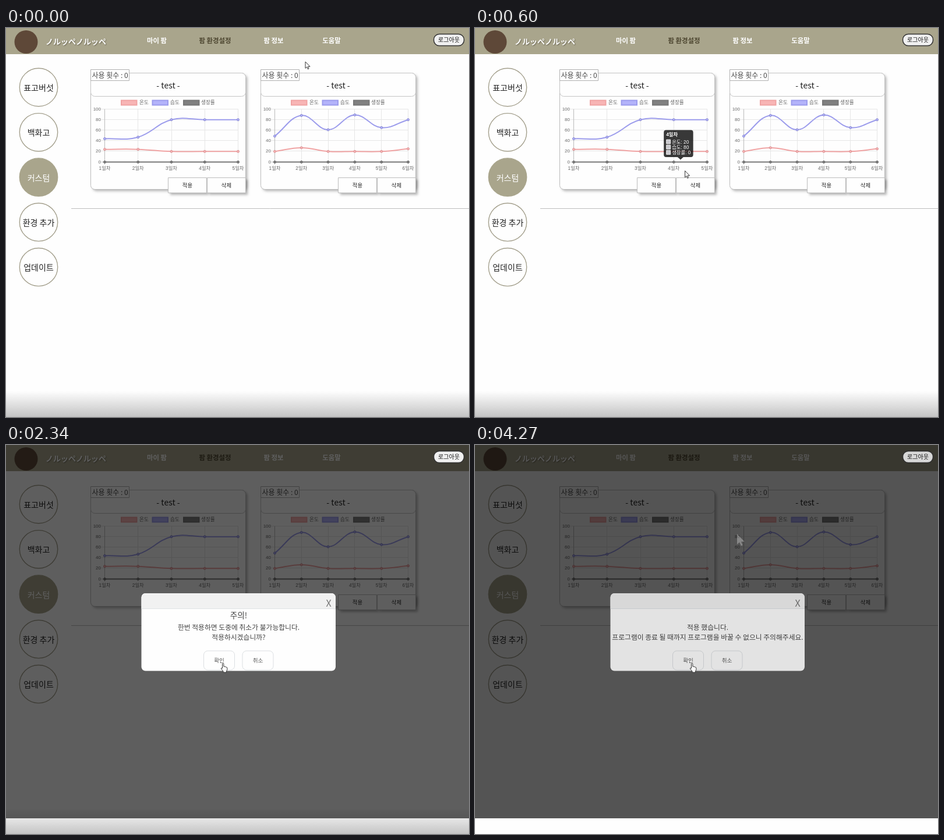
These frames come from a looping animation (795 by 669 pixels, 4.3 s). An HTML page with a canvas:

```html
<!DOCTYPE html>
<html lang="ko">
<head>
<meta charset="utf-8">
<title>팜 환경설정</title>
<style>
html, body { margin: 0; width: 100%; height: 100%; overflow: hidden; background: #fefefe; }
canvas { display: block; }
</style>
</head>
<body>
<canvas id="stage" width="795" height="669"></canvas>
<script>
const LOOP = 4300;
const ctx = document.getElementById('stage').getContext('2d');
const KR = '"Noto Sans CJK KR", "Noto Sans CJK JP", "Noto Sans CJK", sans-serif';
const CHART = '"Liberation Sans", ' + KR;
const OLIVE = '#a9a58c';

const clamp = v => Math.max(0, Math.min(1, v));
const outQuart = v => 1 - Math.pow(1 - clamp(v), 4);
const mix = (a, b, k) => a + (b - a) * k;

function text(s, x, cy, size, color, align = 'center', weight = 400, family = KR) {
  ctx.font = `${weight} ${size}px ${family}`;
  ctx.textAlign = align;
  ctx.fillStyle = color;
  ctx.fillText(s, x, cy + size * 0.36);
}

function box(x, y, w, h, r, fill, stroke, width = 1) {
  ctx.beginPath();
  ctx.roundRect(x, y, w, h, r);
  if (fill) { ctx.fillStyle = fill; ctx.fill(); }
  if (stroke) { ctx.strokeStyle = stroke; ctx.lineWidth = width; ctx.stroke(); }
}

function line(x1, y1, x2, y2, color) {
  ctx.beginPath();
  ctx.moveTo(x1, y1);
  ctx.lineTo(x2, y2);
  ctx.strokeStyle = color;
  ctx.lineWidth = 1;
  ctx.stroke();
}

function shadowed(draw) {
  ctx.save();
  ctx.shadowColor = 'rgba(0,0,0,.28)';
  ctx.shadowOffsetX = ctx.shadowOffsetY = 3;
  ctx.shadowBlur = 4;
  draw();
  ctx.restore();
}

const series = [
  { name: '온도', x: 197, label: 229, fill: '#f8b5b5', line: '#f0a3a3', dot: '#d98f92' },
  { name: '습도', x: 250.5, label: 282, fill: '#b3b3fa', line: '#9c9cec', dot: '#8787d0' },
  { name: '생장률', x: 304, label: 335, fill: '#808080', line: '#777', dot: '#666' }
];
const cards = [
  { dx: 0, data: [[24, 24, 20, 20, 20], [44, 47, 80, 80, 80], [0, 0, 0, 0, 0]] },
  { dx: 292, data: [[20, 27, 20, 20, 20, 25], [49, 88, 61, 89, 65, 80], [0, 0, 0, 0, 0, 0]] }
];
const plot = { x: 169.5, w: 229, top: 139.5, base: 230.5 };
const yOf = v => plot.base - v * 0.91;

// Cubic spline with tension weighted by neighbour distance.
function curve(pts) {
  const capY = y => Math.max(plot.top, Math.min(plot.base, y));
  const ctrl = pts.map((p, i) => {
    const a = pts[i - 1] || p, b = pts[i + 1] || p;
    const da = Math.hypot(p.x - a.x, p.y - a.y), db = Math.hypot(b.x - p.x, b.y - p.y);
    const fa = 0.4 * da / (da + db), fb = 0.4 * db / (da + db);
    const vx = b.x - a.x, vy = b.y - a.y;
    return [p.x - fa * vx, capY(p.y - fa * vy), p.x + fb * vx, capY(p.y + fb * vy)];
  });
  ctx.beginPath();
  ctx.moveTo(pts[0].x, pts[0].y);
  for (let i = 1; i < pts.length; i++) {
    const a = ctrl[i - 1], b = ctrl[i];
    ctx.bezierCurveTo(a[2], a[3], b[0], b[1], pts[i].x, pts[i].y);
  }
  ctx.stroke();
}

function chart(data) {
  series.forEach(s => {
    box(s.x + 1, 124.5, 26.5, 8, 0, s.fill, s.line, 2);
    text(s.name, s.label, 127.5, 8.6, '#666', 'left', 400, CHART);
  });
  for (let v = 0; v <= 100; v += 20) {
    const y = Math.round(yOf(v)) - 0.5;
    line(164.5, y, plot.x + plot.w, y, v ? '#e6e6e6' : '#bbb');
    text(v, 163, y - 0.3, 8, '#666', 'right', 400, CHART);
  }
  const n = data[0].length;
  const xs = data[0].map((_, i) => plot.x + plot.w * i / (n - 1));
  xs.forEach((x, i) => {
    line(Math.floor(x) + 0.5, plot.top, Math.floor(x) + 0.5, 235, i ? '#e6e6e6' : '#bbb');
    text(`${i + 1}일차`, x, 240.7, 8.3, '#666', 'center', 400, CHART);
  });
  for (let k = 2; k >= 0; k--) {
    const pts = data[k].map((v, i) => ({ x: xs[i], y: yOf(v) }));
    ctx.strokeStyle = series[k].line;
    ctx.lineWidth = 2;
    curve(pts);
    pts.forEach(p => {
      ctx.beginPath();
      ctx.arc(p.x, p.y, 2, 0, 7);
      ctx.fillStyle = series[k].fill;
      ctx.fill();
      ctx.strokeStyle = series[k].dot;
      ctx.lineWidth = 1;
      ctx.stroke();
    });
  }
}

function card({ dx, data }) {
  ctx.save();
  ctx.translate(dx, 0);
  shadowed(() => box(145.5, 77.5, 266, 200, 7, '#fefefe'));
  box(145.5, 77.5, 266, 200, 7, null, '#bcbcbc');
  box(145.5, 77.5, 266, 40, 7, '#fefefe', '#c4c4c4');
  text('- test -', 278.5, 98.5, 14, '#222');
  box(145.5, 71.5, 66, 19, 0, '#fefefe', '#b0b0b0');
  text('사용 횟수 : 0', 178.5, 81.7, 12, '#444');
  chart(data);
  [['적용', 278.5], ['삭제', 345.5]].forEach(([s, x]) => {
    shadowed(() => box(x, 257.5, 66, 26, 0, '#fefefe'));
  });
  [['적용', 278.5], ['삭제', 345.5]].forEach(([s, x]) => {
    box(x, 257.5, 66, 26, 0, '#fefefe', '#bcbcbc');
    text(s, x + 33, 270.5, 9.4, '#222');
  });
  ctx.restore();
}

function header() {
  ctx.fillStyle = OLIVE;
  ctx.fillRect(0, 0, 795, 45);
  ctx.beginPath();
  ctx.arc(34.5, 24, 20, 0, 7);
  ctx.fillStyle = '#5e4838';
  ctx.fill();
  ctx.save();
  ctx.shadowColor = 'rgba(60,55,40,.6)';
  ctx.shadowOffsetX = ctx.shadowOffsetY = 1;
  ctx.shadowBlur = 2;
  text('ノルッペノルッペ', 120, 23, 13, '#fff', 'center', 700);
  ctx.restore();
  [['마이 팜', 259], ['팜 환경설정', 359], ['팜 정보', 459.5], ['도움말', 559]].forEach(([s, x], i) =>
    text(s, x, 21.7, 11.4, i === 1 ? '#4d4630' : '#fff', 'center', 700));
}

function logout() {
  box(734.5, 10.5, 52, 20, 9.5, '#f0f0f0', '#333', 1.5);
  text('로그아웃', 760.5, 20.5, 10, '#111');
}

function sidebar() {
  ['표고버섯', '백화고', '커스텀', '환경 추가', '업데이트'].forEach((s, i) => {
    const y = 102 + i * 77.3, on = i === 2;
    ctx.beginPath();
    ctx.arc(56, y, 32.7, 0, 7);
    ctx.fillStyle = on ? OLIVE : '#fefefe';
    ctx.fill();
    ctx.strokeStyle = on ? OLIVE : '#a39f8c';
    ctx.lineWidth = 1.4;
    ctx.stroke();
    text(s, 56, y + 1, 14, on ? '#fff' : '#222');
  });
}

function bottomShade(alpha) {
  if (alpha <= 0) return;
  const g = ctx.createLinearGradient(0, 624, 0, 669);
  g.addColorStop(0, 'rgba(0,0,0,0)');
  g.addColorStop(0.4, `rgba(0,0,0,${0.09 * alpha})`);
  g.addColorStop(1, `rgba(0,0,0,${0.23 * alpha})`);
  ctx.fillStyle = g;
  ctx.fillRect(0, 624, 795, 45);
}

function tooltip(x, y, caretX, day, data, alpha) {
  if (alpha < 0.005) return;
  ctx.save();
  ctx.globalAlpha = alpha;
  ctx.beginPath();
  ctx.roundRect(x, y, 50.5, 46.5, 4);
  ctx.moveTo(caretX - 5, y + 46.5);
  ctx.lineTo(caretX, y + 51);
  ctx.lineTo(caretX + 5, y + 46.5);
  ctx.fillStyle = 'rgba(0,0,0,.78)';
  ctx.fill();
  text(`${day}일차`, x + 4, y + 7.2, 8.3, '#fff', 'left', 700, CHART);
  series.forEach((s, i) => {
    const cy = y + 20 + i * 9.2;
    box(x + 4.5, cy - 3.5, 7, 7, 0, '#c8c8ce', '#eee');
    text(`${s.name}: ${data[i][day - 1]}`, x + 14, cy, 8.3, '#fff', 'left', 400, CHART);
  });
  ctx.restore();
}

function tooltips(t) {
  const rightIn = outQuart((t - 60) / 400), rightOut = outQuart((t - 180) / 400);
  if (t > 60 && t < 580) {
    const k = outQuart((t - 100) / 200);
    const x = mix(482, 466.5, k);
    tooltip(x, mix(104, 162, k), x + 25, 2, cards[1].data, rightIn * (1 - rightOut));
  }
  const leftIn = outQuart((t - 230) / 400), leftOut = outQuart((t - 645) / 400);
  if (t > 230 && t < 1045) {
    const k = outQuart((t - 500) / 300);
    tooltip(mix(354, 317, k), mix(161, 179, k), mix(398, 342, k), t < 500 ? 5 : 4,
      cards[0].data, leftIn * (1 - leftOut));
  }
}

const path = [
  [20, 514, 58], [100, 488, 140], [180, 440, 194], [230, 412, 207], [390, 388, 214],
  [500, 371, 231], [645, 356, 252], [780, 347, 265], [920, 330, 272], [1060, 322, 273]
];

function position(t) {
  if (t <= path[0][0]) return path[0].slice(1);
  for (let i = 1; i < path.length; i++) {
    const a = path[i - 1], b = path[i];
    if (t <= b[0]) {
      const k = (t - a[0]) / (b[0] - a[0]);
      return [mix(a[1], b[1], k), mix(a[2], b[2], k)];
    }
  }
  return path[path.length - 1].slice(1);
}

const arrowShape = new Path2D('M0 0V11.3L2.6 8.9 4.3 12.8 6 12 4.4 8.3H8Z');
const handShape = new Path2D('M2.5 1.2Q3.7 -.2 4.8 1.2V6Q6.3 5.2 7 6.5 8.4 5.8 9 7.2 10.7 6.8 10.8 8.5V11.5L9.5 14V16H4V14L.4 9.8Q-.2 8 2.5 9Z');

function pointer(shape, x, y, stroke = '#333', scale = 1) {
  ctx.save();
  ctx.translate(x, y);
  ctx.scale(scale, scale);
  ctx.fillStyle = '#fff';
  ctx.fill(shape);
  if (stroke) {
    ctx.strokeStyle = stroke;
    ctx.lineWidth = 1;
    ctx.lineJoin = 'round';
    ctx.stroke(shape);
  }
  ctx.restore();
}

function dialog(done) {
  box(232.5, 255, 333.5, 133.5, 7, '#fefefe');
  box(232.5, 255, 333.5, 26, [7, 7, 0, 0], '#f1f1f1');
  line(232.5, 281.5, 566, 281.5, '#dfe2e5');
  text('X', 554, 272.5, 16, '#777');
  const lines = done
    ? ['적용 했습니다.', '프로그램이 종료 될 때까지 프로그램을 바꿀 수 없으니 주의해주세요.']
    : ['한번 적용하면 도중에 취소가 불가능합니다.', '적용하시겠습니까?'];
  if (!done) text('주의!', 399.5, 293, 13.6, '#444');
  lines.forEach((s, i) => text(s, 399.5, 313.5 + i * 17.3, 11.8, '#444'));
  [['확인', 339.5], ['취소', 406]].forEach(([s, x]) => {
    box(x, 354, 53, 33, 7, '#fefefe', '#dcdfe2');
    text(s, x + 26.5, 370.7, 9.6, '#555');
  });
}

function draw(t) {
  ctx.fillStyle = '#fefefe';
  ctx.fillRect(0, 0, 795, 669);
  header();
  sidebar();
  line(112, 310.5, 795, 310.5, '#bdbdbd');
  cards.forEach(card);
  bottomShade(1 - clamp((t - 2340) / 500));

  if (t < 2340) {
    logout();
    tooltips(t);
    const [x, y] = position(t);
    if (t < 690) pointer(arrowShape, x, y);
    else pointer(handShape, x - 3.5, y);
    return;
  }

  ctx.fillStyle = 'rgba(0,0,0,.627)';
  ctx.fillRect(0, 0, 795, 642);
  logout();
  dialog(t >= 2840);
  if (t >= 4190) {
    const step = Math.min(3, Math.floor((t - 4190) / 40) + 1);
    ctx.fillStyle = `rgba(0,0,0,${step * 0.035})`;
    ctx.fillRect(0, 0, 795, 642);
    ctx.globalAlpha = step * 0.1;
    pointer(arrowShape, 450, 153, null, 1.6);
    ctx.globalAlpha = 1;
  }
  pointer(handShape, 369, 375);
}

const start = performance.now();
function tick() {
  draw((performance.now() - start) % LOOP);
  requestAnimationFrame(tick);
}
tick();
</script>
</body>
</html>
```
